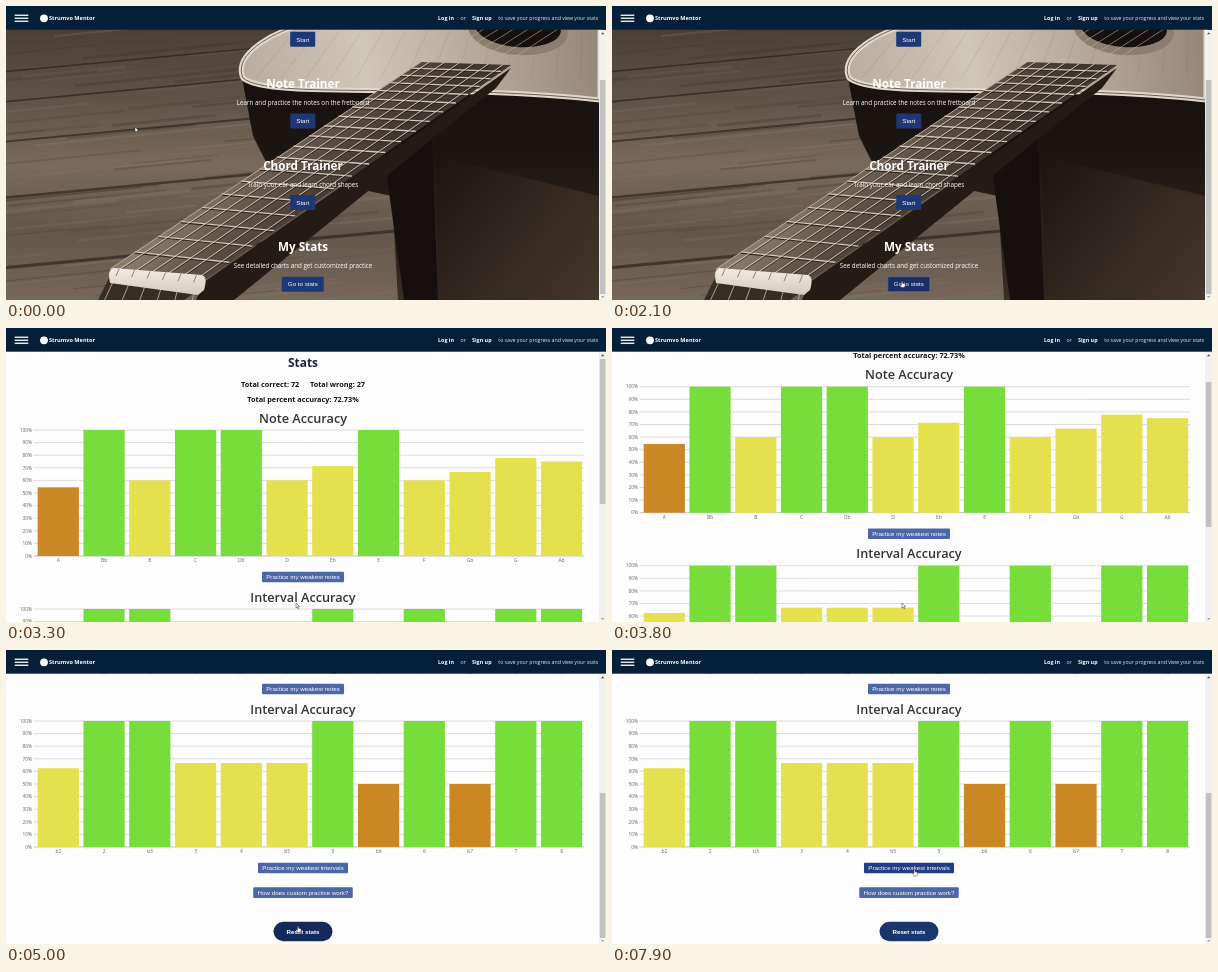
These frames come from a looping animation (600 px wide and 294 px high, 8000 ms). An HTML page with a canvas:

```html
<!DOCTYPE html>
<html lang="en">
<head>
<meta charset="utf-8">
<title>Strumvo Mentor</title>
<style>
html, body { margin: 0; width: 100%; height: 100%; overflow: hidden; background: #fdfdfd; }
canvas { display: block; width: 600px; height: 294px; }
</style>
</head>
<body>
<canvas id="stage"></canvas>
<script>
const W = 600, H = 294, LOOP = 8000, BAR = 24, VIEW = 593;
const OPEN = 2360;
const SANS = '"Open Sans", "Noto Sans", sans-serif';
const ARIAL = '"Liberation Sans", Arial, sans-serif';
const dpr = window.devicePixelRatio || 1;

const mix = (a, b, k) => a + (b - a) * k;
const ease = k => k * k * (3 - 2 * k);
const part = (t, from, len) => ease(Math.max(0, Math.min(1, (t - from) / len)));

function setup(canvas) {
  canvas.width = W * dpr;
  canvas.height = H * dpr;
  const c = canvas.getContext('2d');
  c.scale(dpr, dpr);
  return c;
}
const g = setup(document.getElementById('stage'));
const photo = document.createElement('canvas');
paintPhoto(setup(photo));

function seeded(s) {
  return () => (s = (s * 16807) % 2147483647) / 2147483647;
}
function gradient(c, x0, y0, x1, y1, ...stops) {
  const f = c.createLinearGradient(x0, y0, x1, y1);
  stops.forEach((s, i) => f.addColorStop(i / (stops.length - 1), s));
  return f;
}
function poly(c, pts, fill) {
  c.beginPath();
  for (let i = 0; i < pts.length; i += 2) c.lineTo(pts[i], pts[i + 1]);
  c.closePath();
  c.fillStyle = fill;
  c.fill();
}
function line(c, x0, y0, x1, y1, color, width) {
  c.beginPath();
  c.moveTo(x0, y0);
  c.lineTo(x1, y1);
  c.strokeStyle = color;
  c.lineWidth = width;
  c.stroke();
}

// Sepia guitar lying on a wooden deck
function paintPhoto(c) {
  c.fillStyle = gradient(c, 0, BAR, 0, H, '#4b4037', '#5f5348', '#786a5c', '#63574b', '#75675a');
  c.fillRect(0, 0, W, H);

  const rnd = seeded(71);
  for (let i = 0; i < 90; i++) {
    const y = 30 + rnd() * 290, x = rnd() * 380 - 80, len = 60 + rnd() * 170;
    const tone = rnd() < 0.55 ? '35,27,21' : '160,145,128';
    line(c, x, y, x + len, y - len * 0.1, `rgba(${tone},${0.06 + rnd() * 0.14})`, 0.6 + rnd() * 3);
  }
  for (const y of [66, 96, 136, 192, 262])
    line(c, -5, y, 400, y - 38, 'rgba(30,23,18,.55)', 1 + y / 130);

  // body side
  poly(c, [236, 72, 593, 88, 593, 294, 392, 294, 386, 190, 300, 172, 262, 160, 247, 130],
    gradient(c, 0, 85, 0, H, '#17120f', '#1d1713', '#2b221b', '#3a2e25'));
  poly(c, [430, 150, 593, 190, 593, 294, 432, 294],
    gradient(c, 430, 160, 593, 294, '#1c1612', '#33281f', '#44372c'));
  poly(c, [378, 150, 425, 112, 432, 294, 398, 294], '#15100d');

  // soundboard and its binding
  c.beginPath();
  c.moveTo(290, 20);
  c.bezierCurveTo(255, 32, 228, 52, 237, 72);
  c.bezierCurveTo(262, 94, 430, 76, 594, 94);
  c.lineTo(594, 20);
  c.closePath();
  c.fillStyle = gradient(c, 240, 70, 593, 30, '#b9aea0', '#d0c6b9', '#b5a899', '#94877a');
  c.fill();
  c.lineWidth = 5;
  c.strokeStyle = '#e0d8cc';
  c.stroke();
  c.lineWidth = 1;
  c.strokeStyle = '#6e6154';
  c.stroke();
  for (let i = 0; i < 14; i++)
    line(c, 290 + i * 22, 24, 250 + i * 25, 72, 'rgba(90,76,62,.09)', 1.2);

  // sound hole
  c.beginPath();
  c.ellipse(512, 24, 50, 25, 0.08, 0, 7);
  c.fillStyle = '#8c7e6f';
  c.fill();
  c.beginPath();
  c.ellipse(512, 22, 43, 19, 0.08, 0, 7);
  c.fillStyle = '#15110e';
  c.fill();

  // neck side, fretboard and headstock
  poly(c, [505, 62, 490, 82, 425, 134, 228, 294, 190, 294, 198, 276], '#241b15');
  poly(c, [415, 56, 505, 59, 199, 274, 104, 263],
    gradient(c, 200, 180, 270, 250, '#8a7c6d', '#5e5145', '#41362d'));
  poly(c, [104, 270, 198, 280, 178, 294, 92, 294], '#382d25');

  const at = (u, v) => [
    mix(mix(104, 415, u), mix(199, 505, u), v),
    mix(mix(263, 56, u), mix(274, 59, u), v)
  ];
  for (let i = 1; i < 19; i++) {
    const u = (1 - Math.pow(2, -i / 14)) * 1.64;
    if (u > 0.99) break;
    const a = at(u, 0), b = at(u, 1);
    line(c, ...a, ...b, '#30261f', 2.2);
    line(c, a[0], a[1] - 0.7, b[0], b[1] - 0.7, '#d2c8ba', 1.3);
  }
  line(c, 104, 263, 415, 56, '#b8ac9d', 1);
  for (let i = 0; i < 6; i++) {
    const v = 0.09 + i * 0.164, a = at(0, v), b = at(1, v);
    line(c, a[0], a[1] + 1.4, b[0], b[1] + 1.4, 'rgba(25,18,13,.5)', 1);
    line(c, ...a, ...b, '#d9d0c3', 0.9);
    line(c, ...b, b[0] + 55, 23, '#b9ad9e', 0.6);
    line(c, ...a, a[0] - 14 + i * 2, 294, '#b9ad9e', 0.9);
  }
  c.beginPath();
  c.moveTo(107, 262);
  c.lineTo(196, 269);
  c.quadraticCurveTo(202, 271, 198, 284);
  c.lineTo(192, 289);
  c.lineTo(104, 277);
  c.quadraticCurveTo(101, 264, 107, 262);
  c.fillStyle = gradient(c, 0, 262, 0, 288, '#f1ece3', '#d6ccbe');
  c.fill();
  for (let i = 0; i < 6; i++) line(c, 113 + i * 15.5, 263 + i * 1.2, 110 + i * 15.5, 270 + i * 1.3, '#87796a', 0.9);
}

function text(s, x, y, size, color, weight = 400, align = 'center', font = SANS) {
  g.font = `${weight} ${size}px ${font}`;
  g.fillStyle = color;
  g.textAlign = align;
  g.textBaseline = 'alphabetic';
  g.fillText(s, x, y + size * 0.36);
}
function box(x, y, w, h, r, fill) {
  g.beginPath();
  g.roundRect(x, y, w, h, r);
  g.fillStyle = fill;
  g.fill();
}

let mouse, hand;
function button(label, cx, cy, w, h, o) {
  const x = cx - w / 2, y = cy - h / 2;
  const over = mouse.x > x && mouse.x < x + w && mouse.y > y && mouse.y < y + h;
  if (over) hand = true;
  box(x, y, w, h, o.r, over ? o.hover : o.fill);
  if (over && o.edge) {
    g.strokeStyle = o.edge;
    g.lineWidth = 0.6;
    g.stroke();
  }
  text(label, cx, cy, 6.2, '#fff', o.weight, 'center', ARIAL);
}
const BLUE = { r: 1, fill: '#1e3877', hover: '#1a2f66', edge: '#5d75ad', weight: 400 };
const SOFT = { r: 1, fill: '#4d66a5', hover: '#1f3e85', weight: 400 };
const PILL = { r: 9.7, fill: '#1b366f', hover: '#142a5c', weight: 700 };

function scrollbar(y, h) {
  g.fillStyle = '#f1f1f1';
  g.fillRect(VIEW, BAR, W - VIEW, H - BAR);
  g.fillStyle = '#c1c1c1';
  g.fillRect(VIEW + 0.8, y, 5.6, h);
  poly(g, [595, 28.3, 598.4, 28.3, 596.7, 26.3], '#505050');
  poly(g, [595, 290, 598.4, 290, 596.7, 292], '#a3a3a3');
}

function home() {
  g.drawImage(photo, 0, 0, W, H);
  button('Start', 296.7, 33.3, 25, 15, BLUE);
  const items = [
    ['Note Trainer', 'Learn and practice the notes on the fretboard', 'Start', 25],
    ['Chord Trainer', 'Train your ear and learn chord shapes', 'Start', 25],
    ['My Stats', 'See detailed charts and get customized practice', 'Go to stats', 42]
  ];
  items.forEach(([title, note, label, w], i) => {
    const y = 77.7 + i * 81.6;
    text(title, 297, y, 11.7, '#fff', 700);
    text(note, 297, y + 19, 6.25, '#fff');
    button(label, 296.8, y + 37.3, w, 15, BLUE);
  });
  scrollbar(74, 214);
}

function chart(title, top, names, values, grow) {
  text(title, 297, top - 12, 12.7, '#333', 600);
  for (let i = 0; i <= 10; i++) {
    const y = top + 126 - i * 12.6;
    line(g, 27.5, y, 578, y, i ? '#d9d9d9' : '#bcbcbc', 0.9);
    text(i * 10 + '%', 26, y, 4.8, '#666', 400, 'right');
  }
  names.forEach((name, i) => {
    const v = values[i], cx = 52.3 + i * 45.75, h = v * 1.26 * grow;
    g.fillStyle = v < 59 ? '#cb8724' : v < 90 ? '#e5e14e' : '#76dd3b';
    g.fillRect(cx - 20.6, top + 126 - h, 41.2, h);
    text(name, cx, top + 130.6, 4.9, '#666');
  });
}

const NOTES = 'A Bb B C Db D Eb E F Gb G Ab'.split(' ');
const STEPS = 'b2 2 b3 3 4 b5 5 b6 6 b7 7 8'.split(' ');
const noteScore = [54.5, 100, 60, 100, 100, 60, 71.4, 100, 60, 66.7, 77.8, 75];
const stepScore = [62.5, 100, 100, 66.7, 66.7, 66.7, 100, 50, 100, 50, 100, 100];

function stats(t) {
  const off = scrollAt(t);
  const grow = 1 - Math.pow(1 - Math.min(1, (t - OPEN) / 1000), 4);
  g.fillStyle = '#fdfdfd';
  g.fillRect(0, 0, W, H);
  text('Stats', 297, 35 - off, 11.9, '#10264a', 700);
  text('Total correct: 72', 235, 56 - off, 7.3, '#111', 700, 'left');
  text('Total wrong: 27', 359, 56 - off, 7.3, '#111', 700, 'right');
  text('Total percent accuracy: 72.73%', 297, 71 - off, 7.3, '#111', 700);
  chart('Note Accuracy', 102 - off, NOTES, noteScore, grow);
  button('Practice my weakest notes', 297, 249 - off, 82, 10.6, SOFT);
  chart('Interval Accuracy', 281 - off, STEPS, stepScore, grow);
  button('Practice my weakest intervals', 297, 428 - off, 90, 10.6, SOFT);
  button('How does custom practice work?', 297, 452.6 - off, 99.5, 10.6, SOFT);
  button('Reset stats', 297, 491.5 - off, 59, 19.4, PILL);
  scrollbar(31 + off * 0.533, 145);
}

// Each wheel notch moves the page by the same amount, up to its end
function scrollAt(t) {
  const notches = [3620, 4150, 4470, 4620, 4760];
  return Math.min(210, notches.reduce((s, at) => s + 43.3 * part(t, at, 170), 0));
}

function mouseAt(t) {
  const path = [
    [400, 129, 121], [1500, 290, 275], [4800, 290, 275], [4950, 292, 276],
    [5900, 292, 276], [6400, 298, 243], [6900, 298, 243], [7300, 302.5, 219.5]
  ];
  let [, x, y] = path[0];
  for (let i = 1; i < path.length; i++) {
    const [t0, x0, y0] = path[i - 1], [t1, x1, y1] = path[i];
    const k = part(t, t0, t1 - t0);
    x += (x1 - x0) * k;
    y += (y1 - y0) * k;
  }
  return { x, y };
}

function header() {
  g.fillStyle = '#051f38';
  g.fillRect(0, 0, W, BAR - 0.3);
  g.fillStyle = '#fff';
  for (let i = 0; i < 3; i++) g.fillRect(8.7, 8.6 + i * 3, 13.6, 1.3);
  g.beginPath();
  g.arc(38, 12.3, 3.9, 0, 7);
  g.fill();
  text('Strumvo Mentor', 43, 12.4, 5.6, '#fff', 700, 'left');
  text('Log in', 432, 12.4, 5.4, '#fff', 700, 'left');
  text('or', 454.5, 12.4, 5.2, '#e6eaee', 400, 'left');
  text('Sign up', 466, 12.4, 5.4, '#fff', 700, 'left');
  text('to save your progress and view your stats', 492.3, 12.4, 5.2, '#e6eaee', 400, 'left');
}

function pointer() {
  g.save();
  g.translate(mouse.x, mouse.y);
  g.lineJoin = 'round';
  const shape = hand
    ? [-0.5, 0, 0.5, 0, 0.6, 2.2, 3, 2.8, 3.2, 4.6, 2.4, 6.6, -0.6, 6.6, -2.2, 4, -1.6, 3.4, -0.6, 4.2]
    : [0, 0, 0, 5, 1.2, 4, 2, 5.8, 2.8, 5.4, 2, 3.7, 3.6, 3.6];
  poly(g, shape, '#fff');
  g.strokeStyle = '#222';
  g.lineWidth = 0.45;
  g.stroke();
  g.restore();
}

function frame(now) {
  const t = Math.floor((now % LOOP) / 100) * 100;
  mouse = mouseAt(t);
  hand = false;
  if (t < OPEN) home(); else stats(t);
  header();
  pointer();
  requestAnimationFrame(frame);
}
requestAnimationFrame(frame);
</script>
</body>
</html>
```
